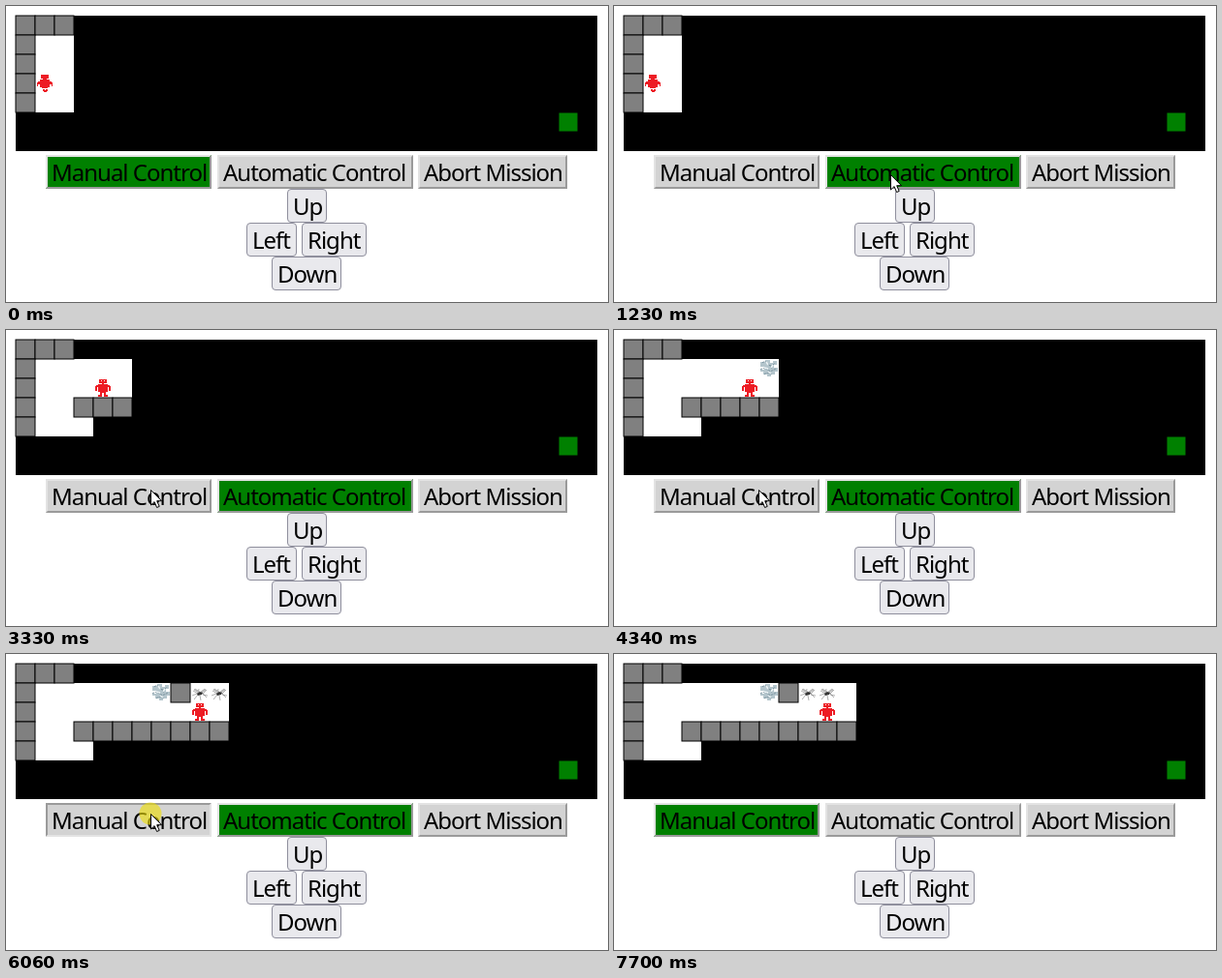
An HTML page that plays this animation: 621x306 px, repeating every 8390 ms.

```html
<!DOCTYPE html>
<html lang="en">
<head>
<meta charset="utf-8">
<title>Robot mission</title>
<style>
  html, body { margin: 0; width: 100%; height: 100%; overflow: hidden; background: #fff; }
  svg { display: block; width: 621px; height: 306px; }
  text { font: 24px "Noto Sans", "Open Sans", sans-serif; letter-spacing: -1px; }
</style>
</head>
<body>
<svg id="stage" viewBox="0 0 621 306" xmlns="http://www.w3.org/2000/svg">
  <defs>
    <g id="wall"><rect width="20" height="20" fill="#808080" stroke="#000"/></g>
    <g id="floor"><rect width="20" height="20" fill="#fff" shape-rendering="crispEdges"/></g>
    <g id="water">
      <path d="M1 3h5v-2h5v3h3v-2h4v4h-3v3h4v4h-3v3h-4v2h-4v-2h-4v-3h-3v-2h4v-3h-4z" fill="#b4c5cc"/>
      <path d="M3 4q3-3 6 1t7-1M1 11q4-3 7 0t9-1M5 16q3-3 8 0M10 6l3 4" fill="none" stroke="#718c98" stroke-width="1" stroke-dasharray="2 1"/>
      <path d="M7 3l2 3M14 6l-2 3M5 9l4 1M9 13l3 2" stroke="#edf3f5" stroke-width="1.5"/>
    </g>
    <g id="bug" fill="none" stroke="#666" stroke-width=".7">
      <path d="M3 8l5 3 1-5M17 7l-4 4 4 4M8 12l-4 5M10 13l1 5M13 12l5 1M2 13l5-2" stroke-opacity=".75"/>
      <path d="M9 10l-5-3 1-1 5 3zM11 9l4-3 1 1-4 3z" fill="#bbb" stroke="#aaa"/>
      <path d="M7 11l3-2 3 1-1 2-4 1z" fill="#333" stroke="none"/>
    </g>
  </defs>
  <rect x="10" y="10" width="600" height="140"/>
  <rect x="570" y="110" width="20" height="20" fill="#008000" stroke="#000"/>
  <g id="board"></g>
  <path id="robot" fill="#ed1c24" fill-rule="evenodd" shape-rendering="crispEdges"/>
  <g id="buttons"></g>
  <circle id="glow" r="11.5" fill="#f0e000" fill-opacity=".6"/>
  <path id="cursor" d="M.5 .5v15.5l3.6-3.4 2.5 5.9 2.6-1.1-2.5-5.7h4.8z" fill="#fff" stroke="#000"/>
</svg>
<script>
const LOOP = 8390, CELL = 20, ORIGIN = 10;
const $ = id => document.getElementById(id);

function add(parent, tag, attrs, text) {
  const el = document.createElementNS("http://www.w3.org/2000/svg", tag);
  for (const key in attrs) el.setAttribute(key, attrs[key]);
  if (text) el.textContent = text;
  return parent.appendChild(el);
}

const place = (el, x, y) => el.setAttribute("transform", `translate(${x} ${y})`);
const show = (el, on) => el.setAttribute("visibility", on ? "visible" : "hidden");
const px = n => ORIGIN + n * CELL;

// Robot path: [time, column, row]
const path = [[0, 1, 1], [0, 1, 2], [0, 1, 3], [1760, 2, 3], [2310, 2, 2]];
[2780, 3330, 3790, 4340, 4810, 5350, 5820, 6370].forEach((t, i) => path.push([t, 3 + i, 2]));

const facing = {
  vertical: "M6 1h8v4h-2v1h3v2h2v1h1v4h-1v-2h-2v3h-2v1h-6v-1h-2v-3h-2v2h-1v-4h1v-1h2v-2h3v-1h-2zM8 16h5v2h-1v1h-3v-1h-1zM10 16v1h1v-1z",
  side: "M6 1h8v4h-3v1h4v1h2v1h1v5h-2v-4h-1v5h-2v3h2v2h-4v-4h-2v4h-4v-2h2v-3h-2v-5h-1v4h-2v-5h1v-1h2v-1h4v-1h-3zM8 2v1h1v-1zM11 2v1h1v-1z"
};

function kind(c, r) {
  if (!c || !r || (r === 3 && c > 2) || (r === 1 && c === 8)) return "wall";
  if (r === 1 && c === 7) return "water";
  if (r === 1 && (c === 9 || c === 10)) return "bug";
  return "floor";
}

// A cell appears once the robot stands next to it.
const cells = [];
for (let r = 0; r < 5; r++) for (let c = 0; c < 12; c++) {
  const seen = path.find(([, x, y]) => Math.abs(x - c) < 2 && Math.abs(y - r) < 2);
  if (!seen) continue;
  const type = kind(c, r);
  const el = add($("board"), "g", {});
  place(el, px(c), px(r));
  if (type !== "wall") add(el, "use", { href: "#floor" });
  if (type !== "floor") add(el, "use", { href: "#" + type });
  cells.push({ el, time: seen[0], type });
}
cells.filter(c => c.type === "wall").forEach(c => $("board").appendChild(c.el));

function modeButton(x, width, label) {
  const g = add($("buttons"), "g", {});
  place(g, x, 154);
  const h = 35;
  const face = add(g, "rect", { width, height: h });
  const lit = add(g, "path", { d: `M0 ${h}V0H${width}l-2 2H2V${h - 2}z` });
  const shade = add(g, "path", { d: `M${width} 0V${h}H0l2-2H${width - 2}V2z` });
  add(g, "text", { x: 6, y: 27 }, label);
  return (active, pressed) => {
    face.setAttribute("fill", active ? "#008000" : "#d3d3d3");
    lit.setAttribute("fill", pressed ? "#9a9a9a" : "#e3e3e3");
    shade.setAttribute("fill", pressed ? "#e3e3e3" : "#9a9a9a");
  };
}

function plainButton(x, y, width, label) {
  const g = add($("buttons"), "g", {});
  place(g, x, y);
  add(g, "rect", { x: .5, y: .5, width: width - 1, height: 34, rx: 3.5, fill: "#e9e9ed", stroke: "#8f8f9d" });
  add(g, "text", { x: 6, y: 27 }, label);
}

const manual = modeButton(41, 171, "Manual Control");
const auto = modeButton(218, 202, "Automatic Control");
modeButton(425, 154, "Abort Mission")(false, false);
plainButton(290, 189, 41, "Up");
plainButton(248, 224, 52, "Left");
plainButton(305, 224, 67, "Right");
plainButton(274, 259, 72, "Down");

// Pointer stops after the first glide: [time, x, y]
const stops = [[840, 285, 174], [2710, 238, 178], [2780, 192, 178],
  [2950, 172, 172], [3025, 156, 167], [3100, 149, 165], [7610, 181, 173]];
const latest = (list, t) => list.filter(s => s[0] <= t).pop();

function pointer(t) {
  if (t < 380 || t >= 7700) return null;
  if (t >= 840) return latest(stops, t).slice(1);
  const p = Math.floor((t - 380) / 460 * 6) / 6;
  const rest = (1 - p) ** 1.6;
  return [Math.round(285 + 292 * rest), Math.round(174 - 27 * rest)];
}

function draw(t) {
  for (const c of cells) show(c.el, t >= c.time);

  const [, col, row] = latest(path, t);
  const upDown = t < 1760 || (t >= 2310 && t < 2780);
  $("robot").setAttribute("d", upDown ? facing.vertical : facing.side);
  place($("robot"), px(col), px(row));

  const pressAuto = t >= 1150 && t < 1230;
  const pressManual = t >= 6060 && t < 6220;
  const isAuto = t >= 1230 && t < 6220;
  manual(!isAuto, pressManual);
  auto(isAuto, pressAuto);

  const at = pointer(t);
  show($("cursor"), at);
  show($("glow"), pressAuto || pressManual);
  if (at) {
    place($("cursor"), ...at);
    place($("glow"), ...at);
  }
}

const start = performance.now();
function tick() {
  draw((performance.now() - start) % LOOP);
  requestAnimationFrame(tick);
}
tick();
</script>
</body>
</html>
```
